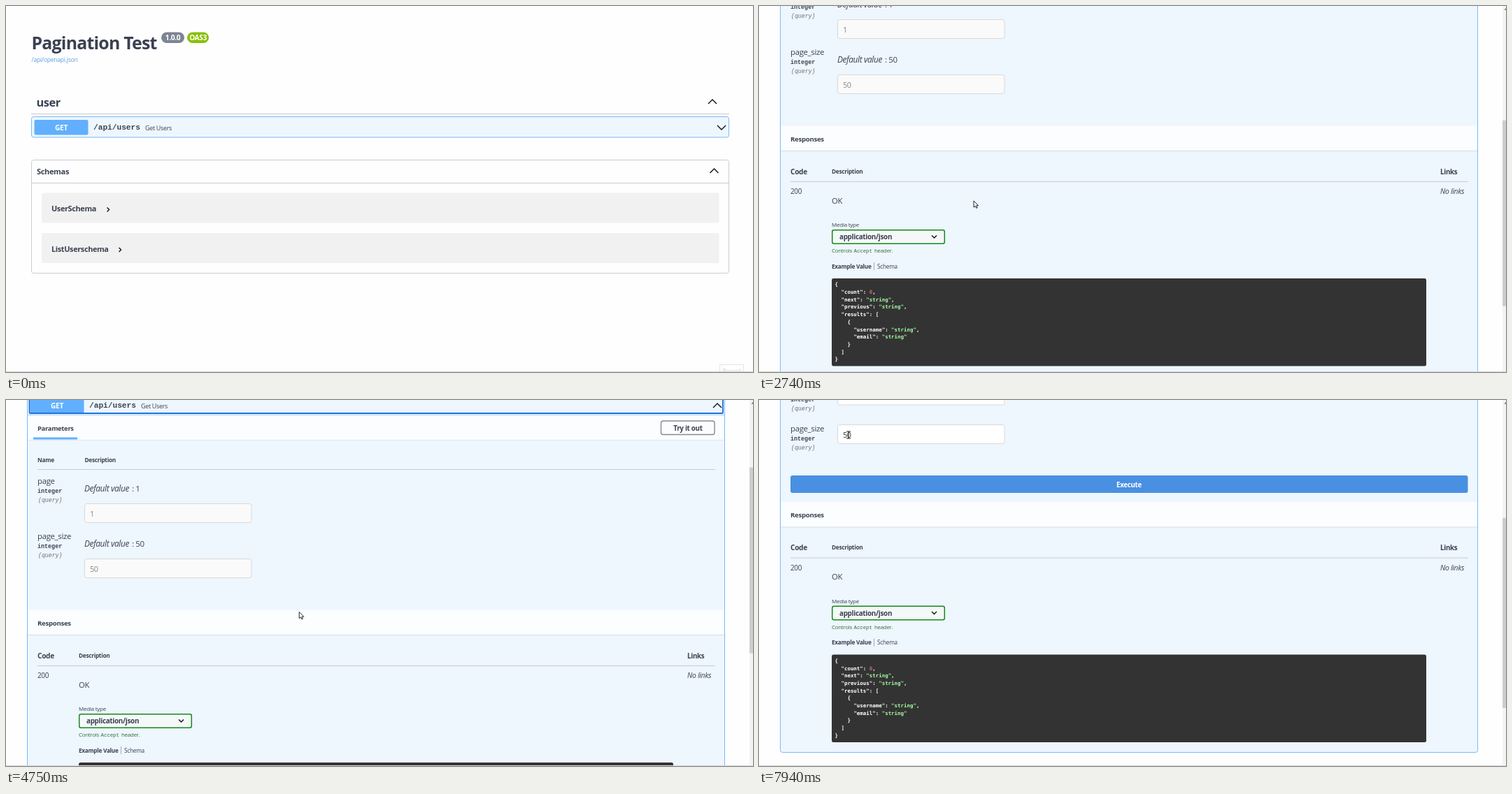
These frames come from a looping animation (1068x524 px, 8000 ms). An HTML page:

```html
<!DOCTYPE html>
<html lang="en">
<head>
<meta charset="utf-8">
<title>API docs</title>
<style>
html, body { margin: 0; width: 100%; height: 100%; overflow: hidden; background: #fefefe; }
svg { display: block; width: 100%; height: 100%; }
text { font-family: "Open Sans", "Noto Sans", sans-serif; fill: #3b4151; letter-spacing: -.03em; white-space: pre; }
.b { font-weight: 700; }
.i { font-style: italic; }
.mono { font-family: "Liberation Mono", monospace; letter-spacing: 0; }
.code { font-family: "DejaVu Sans Mono", monospace; font-weight: 700; letter-spacing: 0; fill: #fff; }
.mid { text-anchor: middle; }
.w { fill: #fff; }
.chev { fill: none; stroke: #111; stroke-width: 1.4; }
</style>
</head>
<body>
<svg id="stage" viewBox="0 0 1068 524"></svg>
<script>
const LOOP = 8000, PRESS = 830, OPEN = 910, TRY = 5720;
const TRY_SHIFT = -23.5;
const GREY = '#c9ccd1', BLUE = '#61affe', PALE = '#eef6fe';

const text = (x, y, size, str, cls = '', extra = '') =>
  `<text x="${x}" y="${y}" font-size="${size}" class="${cls}" ${extra}>${str}</text>`;
const rect = (x, y, w, h, fill, extra = '') =>
  `<rect x="${x}" y="${y}" width="${w}" height="${h}" fill="${fill}" ${extra}/>`;
const rule = (x1, x2, y, color = GREY) =>
  `<path d="M${x1} ${y}H${x2}" stroke="${color}" fill="none"/>`;
const chevron = (x, y, rx, ry) =>
  `<path class="chev" d="M${x - rx} ${y + ry}L${x} ${y - ry}L${x + rx} ${y + ry}"/>`;
const arrowRight = (x, y) =>
  `<path class="chev" d="M${x - 1.5} ${y - 3}l3 3l-3 3"/>`;
const group = (id, body, extra = '') => `<g id="${id}" ${extra}>${body}</g>`;

function header() {
  return text(30.5, 61.5, 24.8, 'Pagination Test', 'b') +
    rect(216, 37.5, 33, 15.5, '#7d8492', 'rx="7.8"') +
    text(232.5, 49, 10.2, '1.0.0', 'b w mid') +
    rect(253, 37.5, 31, 15.5, '#89bf04', 'rx="7.8"') +
    text(268.5, 49, 10, 'OAS3', 'b w mid') +
    text(30.5, 80, 8.6, '/api/openapi.json', '', 'style="fill:#5b9fe0"') +
    text(37.5, 143.5, 16.4, 'user', 'b') +
    chevron(1004, 137, 6, 3) +
    rule(30, 1028, 154.5);
}

function summary() {
  return rect(34.5, 163, 77, 21.5, BLUE, 'rx="2"') +
    text(73, 177.5, 10.2, 'GET', 'b w mid') +
    text(119, 177, 11.16, '/api/users', 'mono b') +
    text(193, 178, 8.9, 'Get Users');
}

function frameBox(bottom) {
  return rect(30.5, 158.5, 997, bottom - 158.5, PALE, `rx="3" stroke="${BLUE}" stroke-opacity=".85"`);
}

function param(y, name, value, editable) {
  const boxY = editable ? y - 9 : y + 28.5;
  const detail = editable ? '' :
    text(112, y + 11, 11.8, 'Default value', 'i') + text(180, y + 11, 11.5, ': ' + value);
  return text(45, y, 11.4, name) +
    text(45, y + 13, 8.4, 'integer', 'mono b') +
    text(46, y + 26, 8.2, '(query)', 'mono i', 'style="fill:#6b7078"') +
    detail +
    rect(112.5, boxY, 238.5, 27, editable ? '#fff' : '#fafafa', 'rx="3" stroke="#d9d9d9"') +
    text(120, boxY + 18.5, 10.8, value, '', `style="fill:${editable ? '#333' : '#858585'}"`);
}

function parameters(editable) {
  const button = editable
    ? rect(949, 196, 64, 19.5, '#fdfefe', 'rx="3" stroke="#6f747d" stroke-width="1.6"') +
      text(981, 210, 9.6, 'Cancel', 'b mid')
    : rect(936.5, 196, 76.5, 19.5, '#fbfdfe', 'rx="3" stroke="#858a92" stroke-width="1.4"') +
      text(975, 210.3, 9.8, 'Try it out', 'b mid');
  return rect(31, 188, 996, 35.5, '#fbfdff') +
    rule(31, 1027, 187.5, '#a9d2fa') + rule(31, 1027, 223.5, '#dfe7ee') +
    text(45, 210, 9.4, 'Parameters', 'b') +
    rect(39, 219.5, 63, 3, BLUE) + button +
    text(45, 254.7, 8.3, 'Name', 'b') + text(112.5, 254.7, 8.2, 'Description', 'b') +
    rule(45, 1014, 265.5) +
    param(286, 'page', '1', editable) +
    param(editable ? 341.5 : 365, 'page_size', '50', editable);
}

function codeLine(line, i) {
  const indent = line.search(/\S/);
  const body = line.trim()
    .replace(/: ("\w+")/, ': <tspan fill="#a2fca2">$1</tspan>')
    .replace(/: (\d)/, ': <tspan fill="#d36363">$1</tspan>');
  return text(108.5 + indent * 4.48, 696.3 + i * 10.7, 7.45, body, 'code');
}

function responses() {
  const sample = { count: 0, next: 'string', previous: 'string',
    results: [{ username: 'string', email: 'string' }] };
  const green = 'style="fill:#2f6b35"';
  return rect(31, 466.5, 996, 36, '#fbfdff') + rule(31, 1027, 502.5, '#d5dde5') +
    text(45, 488.6, 9.65, 'Responses', 'b') +
    text(45, 535.7, 10.1, 'Code', 'b') + text(104, 534.7, 8.2, 'Description', 'b') +
    text(974, 535.7, 9.8, 'Links', 'b') + rule(45, 1014, 546.5) +
    text(45, 564.3, 9.9, '200') + text(974, 564.3, 10.4, 'No links', 'i') +
    text(104, 577.5, 11.2, 'OK') +
    text(104, 611, 8, 'Media type') +
    rect(104.7, 615.7, 160.6, 19.6, '#f5f8f8', 'rx="2.5" stroke="#128a1c" stroke-width="1.5"') +
    text(115, 629.4, 9.85, 'application/json', 'b') +
    '<path class="chev" d="M247 623.5l3.5 3.5l3.5 -3.5"/>' +
    text(104, 648.3, 7.85, 'Controls', '', green) +
    text(135.5, 648.3, 7.3, 'Accept', 'mono', green) +
    text(165, 648.3, 7.85, 'header.', '', green) +
    text(104, 670.7, 8.2, 'Example Value', 'b') +
    '<path d="M164.5 662V673" stroke="#a5abb3"/>' +
    text(169, 670.7, 8.25, 'Schema') +
    rect(104, 685, 850, 125.5, '#333', 'rx="2.5"') +
    JSON.stringify(sample, null, 2).split('\n').map(codeLine).join('');
}

function schemas() {
  const row = (y, name, x) => rect(45, y, 968.5, 43, '#f1f1f1', 'rx="2.5"') +
    text(59, y + 26.5, 10.85, name, 'b') + arrowRight(x, y + 24);
  return rect(30.5, 220.5, 997, 162, '#fefefe', `rx="3" stroke="${GREY}"`) +
    rule(31, 1027, 253.5) +
    text(38, 240.5, 11, 'Schemas', 'b') + chevron(1006.5, 236, 6, 3) +
    row(267.5, 'UserSchema', 140) + row(325, 'ListUserschema', 157);
}

const cursors = {
  arrow: '<path d="M0 0V9.2L2.2 7.3L3.7 10.4L5.2 9.7L3.8 6.7H6.6Z" fill="#fff" stroke="#111" stroke-width=".9"/>',
  hand: '<path d="M-1.2 .6Q0 -.6 1.2 .6V5L6.5 6.5Q7.5 7 7.2 9L6 14H-.5L-4.6 8.3Q-4.4 7 -3 7.6L-1.2 9Z" fill="#fff" stroke="#111" stroke-width=".9"/>',
  beam: '<path d="M-3 -5H3M-3 5H3M0 -5V5" fill="none" stroke="#222" stroke-width="1.1"/>'
};

const execute = rect(45, 405, 968.5, 25, '#4990e2', 'rx="3"') +
  text(529, 421.6, 9.7, 'Execute', 'b w mid');

document.getElementById('stage').innerHTML =
  rect(0, 0, 1068, 524, '#fefefe') +
  group('page',
    header() +
    group('closed', frameBox(188) + '<path class="chev" d="M1011 171l6 6l6 -6"/>') +
    group('plain', frameBox(825) + parameters(false)) +
    group('editing', frameBox(801.5) + parameters(true) + execute) +
    group('responses', responses()) +
    summary() +
    group('collapse', chevron(1017, 174, 6, 3)) +
    group('ring', rect(33.5, 162.5, 991.5, 22.5, 'none', 'stroke="#1f70dc" stroke-width="1.8" rx="1"')) +
    group('schemas', schemas())) +
  group('bar', rect(1063, 0, 5, 524, '#f3f3f3') +
    '<path d="M1065.5 5.5L1068 3V5.5Z" fill="#555"/>' +
    rect(1063, 10, 5, 266, '#cdcdcd', 'id="thumb"')) +
  group('record', rect(1020.5, 513.5, 34, 14, '#fefefe', 'stroke="#e6e6e6"') +
    text(1037.5, 526, 8.5, 'Record', 'mid', 'style="fill:#d2d2d2"')) +
  rule(0, 1068, 523.5, '#d9d9d9') +
  group('cursor', Object.entries(cursors).map(([id, shape]) => group(id, shape)).join(''));

const $ = id => document.getElementById(id);
const show = (id, on) => $(id).setAttribute('display', on ? 'inline' : 'none');
const move = (id, x, y) => $(id).setAttribute('transform', `translate(${x} ${y})`);
const clamp = v => Math.min(1, Math.max(0, v));
const smooth = k => k * k * (3 - 2 * k);

// Pointer path: time, x, y
const path = [
  [0, 1037, 519], [70, 1037, 519], [790, 292, 163], [1240, 292, 163],
  [1790, 295, 234], [2000, 297, 264], [2740, 307, 279], [3460, 339.5, 291], [4060, 339.5, 291],
  [4750, 419, 303.5], [5600, 970, 206], [5720, 970, 206], [5930, 859, 215],
  [6450, 483, 258], [6600, 483, 258], [7000, 404, 113], [7320, 362, 117], [7600, 217, 108],
  [7900, 128, 50], [LOOP, 128, 50]
];

// Slope at a key that never overshoots: zero at stops and turns
function slope(i, axis) {
  if (i === 0 || i === path.length - 1) return 0;
  const rate = j => (path[j + 1][axis] - path[j][axis]) / (path[j + 1][0] - path[j][0]);
  const a = rate(i - 1), b = rate(i);
  return a * b > 0 ? 2 * a * b / (a + b) : 0;
}

function pointer(t) {
  const i = path.findIndex(p => p[0] > t) - 1;
  const a = path[i], b = path[i + 1], span = b[0] - a[0], k = (t - a[0]) / span;
  return [1, 2].map(axis =>
    a[axis] + (b[axis] - a[axis]) * smooth(k) +
    span * k * (1 - k) * ((1 - k) * slope(i, axis) - k * slope(i + 1, axis)));
}

// Scroll glides: start, end, distance
const glides = [
  [2100, 2280, 99], [2340, 2520, 99], [2575, 2755, 99], [2880, 3060, 99], [3210, 3390, 99],
  [4578, 4861, -495],
  [6150, 6450, 297]
];

const scrollAt = t => Math.round(glides.reduce((sum, [from, to, distance]) =>
  sum + distance * smooth(clamp((t - from) / (to - from))), 0));

function cursorKind(x, y, editing) {
  const over = (x1, y1, x2, y2) => x >= x1 && x <= x2 && y >= y1 && y <= y2;
  if (over(31, 159, 1027, 187) || over(editing ? 949 : 937, 196, 1013, 216)) return 'hand';
  if (editing && over(45, 405, 1013, 430)) return 'hand';
  if (editing && (over(112, 277, 351, 304) || over(112, 332, 351, 360))) return 'beam';
  return 'arrow';
}

function draw(t) {
  const open = t >= OPEN, editing = t >= TRY;
  const scroll = scrollAt(t), shift = editing ? TRY_SHIFT : 0;
  show('closed', !open);
  show('plain', open && !editing);
  show('editing', editing);
  show('responses', open);
  show('collapse', open);
  show('ring', t >= PRESS && !editing);
  show('bar', open);
  show('record', t < 140);
  move('page', open ? 0 : 6, -scroll);
  move('responses', 0, shift);
  move('schemas', 0, open ? 636 + shift : 0);
  $('thumb').setAttribute('y', 10 + scroll * (editing ? .535 : .521));
  $('thumb').setAttribute('height', editing ? 272 : 266);

  const [x, y] = pointer(t);
  const kind = cursorKind(x, y + scroll, editing);
  for (const id in cursors) show(id, id === kind);
  show('cursor', t >= 70);
  move('cursor', x, y);
}

const start = performance.now();
function tick() {
  draw((performance.now() - start) % LOOP);
  requestAnimationFrame(tick);
}
tick();
</script>
</body>
</html>
```
